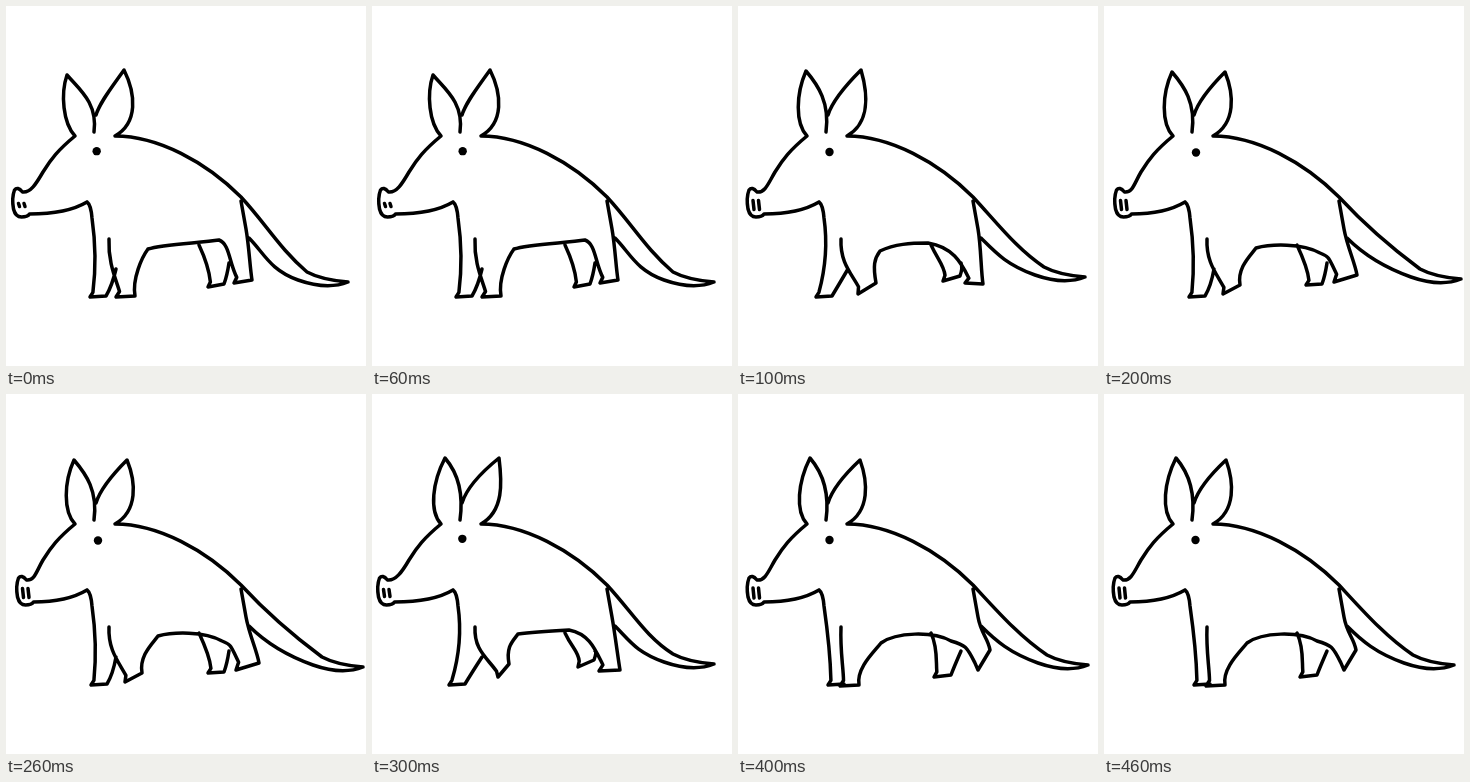
Write an HTML page that moves like this. It is 360 px wide and 360 px high and loops after 500 ms.

```html
<!DOCTYPE html>
<html lang="en">
<head>
<meta charset="utf-8">
<title>Walking aardvark</title>
<style>
  html, body { margin: 0; width: 100%; height: 100%; overflow: hidden; background: #fff; }
  svg { display: block; width: 100%; height: 100%; }
  path { fill: none; stroke: #000; stroke-width: 3.5; stroke-linecap: round; stroke-linejoin: round; }
</style>
</head>
<body>
<svg viewBox="0 0 360 360">
  <path id="body"/>
  <circle id="eye" r="4.2"/>
</svg>
<script>
const STEP = 100;

// Ear tips, snout shift, nostril length, tail tip, belly ends and hooves (toe, heel).
const poses = [
  { ears: [[61, 69], [118, 64]], nose: -2.5, nostril: 3, tail: [342, 276], belly: [[142, 243], [213, 234]],
    lead: 84, fore: [[110, 291], [129, 290]], hind: [[228, 277], [246, 274]], far: [[202, 281], [218, 278]] },
  { ears: [[68, 65], [123, 64]], nose: 0, nostril: 9, tail: [347, 271], belly: [[142, 245], [190, 237]],
    lead: 78, fore: [[120, 288], [138, 277]], hind: [[227, 277], [245, 278]], far: [[205, 275], [222, 270]] },
  { ears: [[68, 66], [121, 66]], nose: 1.5, nostril: 9, tail: [357, 273], belly: [[152, 242], [216, 247]],
    lead: 85, fore: [[119, 288], [136, 279]], hind: [[230, 276], [253, 269]], far: [[202, 279], [218, 278]] },
  { ears: [[73, 64], [127, 64]], nose: -3.5, nostril: 7, tail: [342, 270], belly: [[146, 240], [197, 236]],
    lead: 77, fore: [[126, 283], [137, 270]], hind: [[227, 277], [248, 276]], far: [[206, 273], [222, 266]] },
  { ears: [[72, 64], [122, 66]], nose: 0, nostril: 10, tail: [350, 271], belly: [[143, 249], [213, 247]],
    lead: 90, fore: [[102, 292], [121, 291]], hind: [[240, 276], [252, 256]], far: [[196, 283], [213, 281]] }
];

const by = ([x, y], dx, dy) => [x + dx, y + dy];

// The ankle sits above the toe and tilts with the hoof.
function ankleOf([toe, heel]) {
  const dx = heel[0] - toe[0], dy = heel[1] - toe[1];
  return by(toe, 0.2 * dx + 0.28 * dy, 0.2 * dy - 0.28 * dx);
}

function drawEars([left, right]) {
  return `M69 130C57 117 ${left[0] / 2 + 24} 88 ${left}C${by(left, 12, 14)} 92 97 88 126
    M90 109C94 96 106 81 ${right}C130 88 132 117 109 130`;
}

function drawFace(n, length) {
  const top = 199 - length / 2;
  return `M69 130C52 144 45 153 37 166C30 178 ${27 + n} 187 ${19 + n} 186
    Q${14 + n} 180 ${11 + n} 184Q${8 + n} 192 ${10 + n} 203Q${12 + n} 211 ${18 + n} 211
    Q${24 + n} 211 ${26 + n} 208C46 208 66 205 81 196
    M${15 + n} ${top}l1 ${length}M${20.5 + n} ${top}l1 ${length}`;
}

function drawFront({ lead, fore, belly }) {
  const hoof = [[lead, 291], [lead + 16, 290]];
  const shin = ankleOf(hoof), ankle = ankleOf(fore), [toe, heel] = fore;
  const hidden = toe[0] < lead + 16;
  return `M81 196Q85 199 86 212C90 240 ${shin[0] / 2 + 46} 266 ${shin}L${hoof[0]}L${hoof[1]}
    ${hidden ? '' : `Q${by(hoof[1], 6, -10)} 110 263`}
    M103 233C102 256 ${(ankle[0] + 105) / 2} ${ankle[1] - 14} ${ankle}L${toe}L${heel}
    C${by(heel, -3, -17)} ${by(belly[0], -6, 8)} ${belly[0]}`;
}

function drawHind({ belly: [start, end], hind, far }) {
  const ankle = ankleOf(hind), farAnkle = ankleOf(far);
  return `M${start}C${start[0] + 15} 238 ${end[0] - 18} 237 ${end}
    C${end[0] * 0.4 + ankle[0] * 0.6} ${end[1] + 4} ${by(ankle, -8, -16)} ${ankle}
    L${hind[0]}L${hind[1]}C${by(hind[1], -2, -12)} 243 240 240 223L235 195
    M193 239C200 254 ${by(farAnkle, -1, -10)} ${farAnkle}L${far[0]}L${far[1]}
    Q${by(far[1], 3, -8)} 223 257`;
}

function drawTail(tip) {
  return `M109 130C152 130 200 156 235 191C260 218 ${tip[0] - 68} 243 ${by(tip, -41, -10)}
    C${by(tip, -28, -3)} ${by(tip, -12, -1)} ${tip}
    C${by(tip, -15, 6)} ${by(tip, -33, 4)} ${by(tip, -50, -2)}
    C${by(tip, -78, -12)} 258 247 243 232`;
}

const body = document.getElementById('body');
const eye = document.getElementById('eye');

function show(pose) {
  body.setAttribute('d', drawEars(pose.ears) + drawFace(pose.nose, pose.nostril) +
    drawFront(pose) + drawHind(pose) + drawTail(pose.tail));
  eye.setAttribute('cx', 91.5 + pose.nose / 3);
  eye.setAttribute('cy', 146 + pose.nose / 3);
}

const start = performance.now();
function tick() {
  const time = performance.now() - start;
  show(poses[Math.floor(time / STEP) % poses.length]);
  requestAnimationFrame(tick);
}
tick();
</script>
</body>
</html>
```
